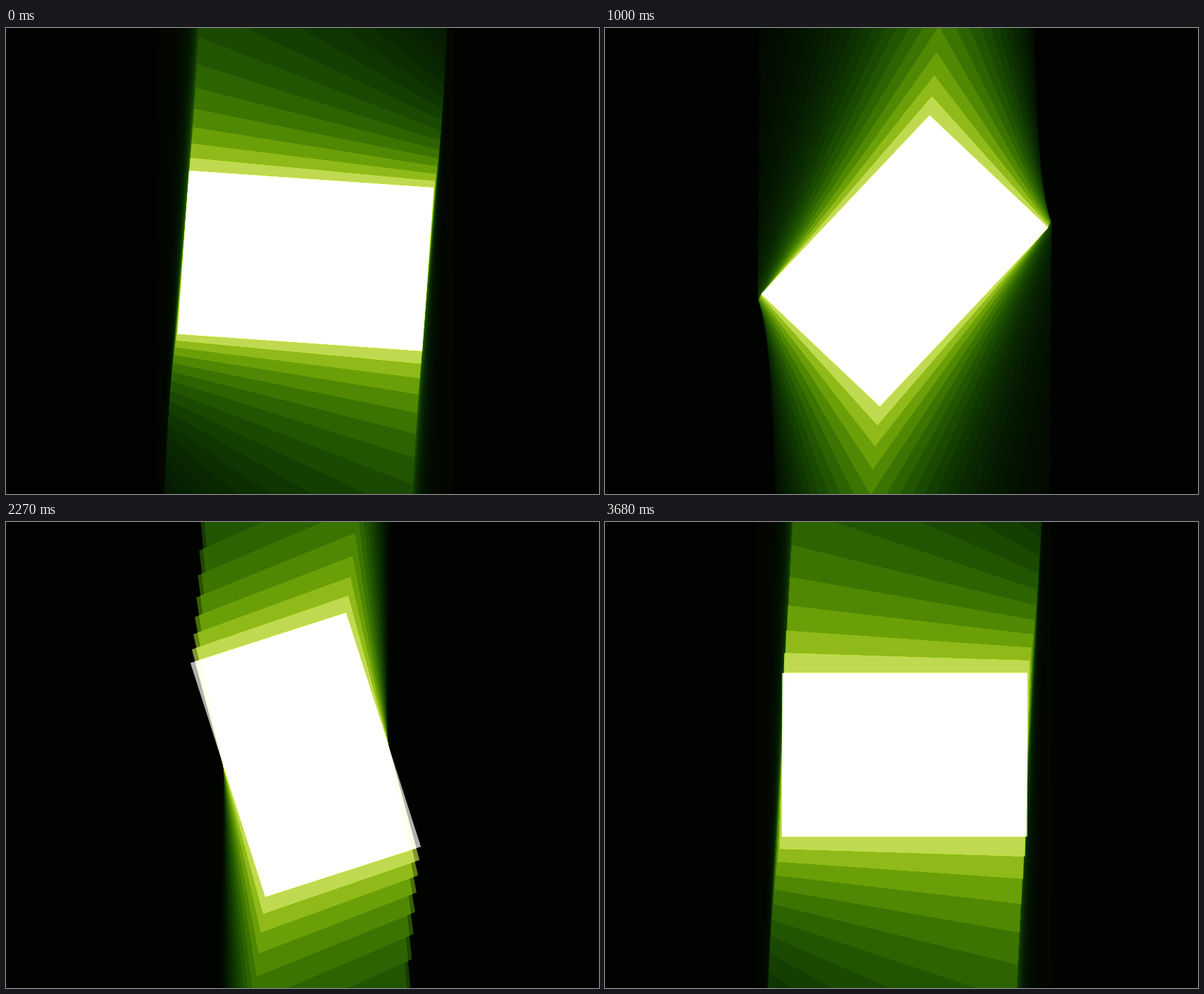
An HTML page with a canvas that plays this animation: 845x663 px, repeating every 3.72 s.

```html
<!DOCTYPE html>
<html lang="en">
<head>
<meta charset="utf-8">
<title>Turning light</title>
<style>
  html, body { margin: 0; width: 100%; height: 100%; overflow: hidden; background: #000; }
  canvas { display: block; }
</style>
</head>
<body>
<canvas width="845" height="663"></canvas>
<script>
const ctx = document.querySelector('canvas').getContext('2d', { alpha: false });
const LOOP = 3720, HOLD = 53, ECHOES = 36;
const CX = 427, CY = 331.2, W = 349.5, H = 232.8;

// key points: time, angle in degrees, and how late (ms) the echoes run there
const keys = [
  [0, 4, 0], [320, -12.4, 15], [1000, -46.6, 2], [1930, -91.6, 8],
  [2620, -126.7, 17], [3080, -148.3, 0], [3680, -180, 11], [LOOP, -182, 11]
];

const segment = t => Math.max(1, keys.findIndex(key => key[0] >= t));

// the picture is held for about HOLD ms, evenly between key points
function holdStart(t) {
  const i = keys.findIndex(key => key[0] > t);
  const start = keys[i - 1][0], span = keys[i][0] - start;
  const length = span / Math.max(1, Math.round(span / HOLD));
  return start + Math.floor((t - start) / length) * length;
}

function angleAt(t) {
  const i = segment(t);
  const [t0, a0] = keys[i - 1], [t1, a1] = keys[i];
  return a0 + (a1 - a0) * (t - t0) / (t1 - t0);
}

// echoes come at 60 per second, slower when running late
function stepAt(t) {
  const [time, , late] = keys[t > 0 ? segment(t) : 0];
  return 16.7 + late * Math.exp((t - time) / 120);
}

function echoesBefore(t) {
  const echoes = [];
  for (let k = 0, scale = 1; k <= ECHOES; k++) {
    echoes.push({ angle: angleAt(t), scale });
    const step = stepAt(t);
    scale *= 1 + 0.0071 * step;
    t -= step;
  }
  return echoes.reverse();
}

function cover(mode, colour) {
  ctx.resetTransform();
  ctx.globalCompositeOperation = mode;
  ctx.fillStyle = colour;
  ctx.fillRect(0, 0, 845, 663);
}

function draw(t) {
  cover('source-over', '#000');
  // oldest first: fade everything, then add the next rectangle's light
  for (const { angle, scale } of echoesBefore(t)) {
    cover('multiply', 'rgb(191, 218, 80)');
    ctx.setTransform(1, 0, 0, scale, CX, CY);
    ctx.rotate(angle * Math.PI / 180);
    ctx.globalCompositeOperation = 'lighter';
    ctx.fillStyle = 'rgb(175, 175, 175)';
    ctx.fillRect(-W / 2, -H / 2, W, H);
  }
  cover('lighten', '#010300');
}

let shown = -1;
function tick() {
  const t = holdStart(performance.now() % LOOP);
  if (t !== shown) draw(shown = t);
  requestAnimationFrame(tick);
}
tick();
</script>
</body>
</html>
```
